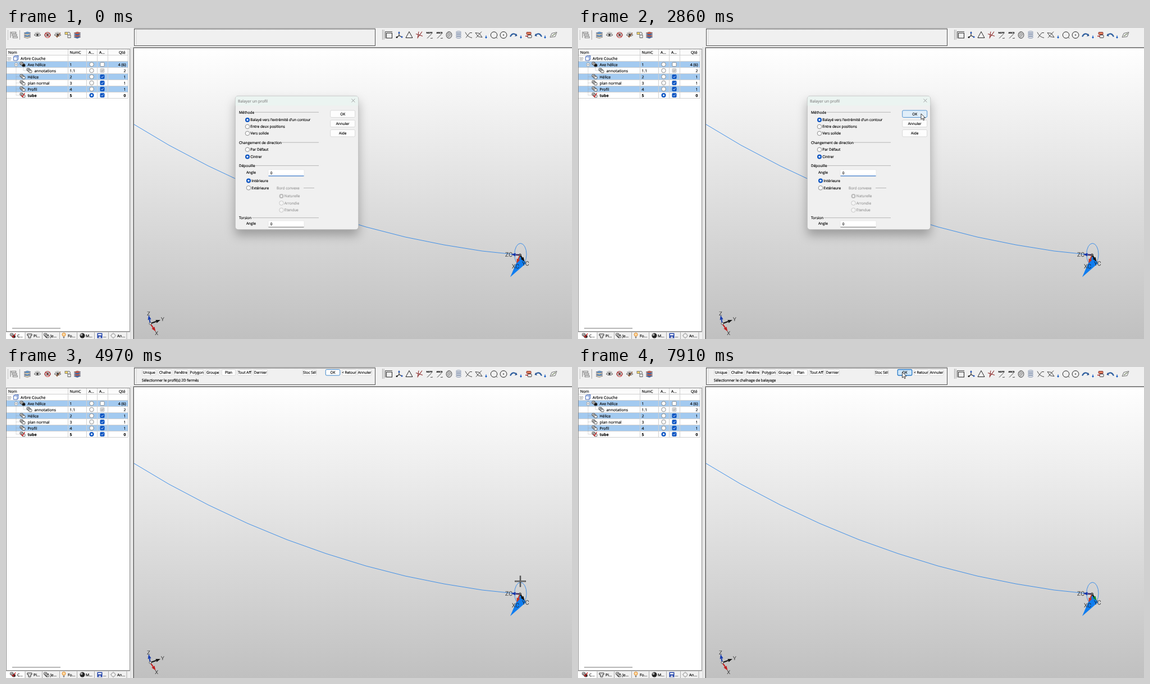
An HTML page that plays this animation: 1008 px wide and 555 px high, repeating every 7990 ms.

```html
<!DOCTYPE html>
<html lang="fr">
<head>
<meta charset="utf-8">
<style>
html, body { margin: 0; width: 100%; height: 100%; overflow: hidden; background: #f0f0f0; }
svg { display: block; width: 1008px; height: 555px; }
text { font-family: "Open Sans", "Noto Sans", sans-serif; text-rendering: geometricPrecision; white-space: pre;
  fill: currentColor; stroke: currentColor; stroke-width: .16px; }
.axis { font-family: Roboto, "Open Sans", sans-serif; font-weight: 300; }
</style>
</head>
<body>
<svg id="stage" viewBox="0 0 1008 555"></svg>
<script>
const LOOP = 7990, TICK = 77.6;
const BLUE = '#0a53c1', LINE = '#3f8fe8', INK = '#000', SMALL = 6.45, MEDIUM = 6.9;

// Drawing helpers, each returns SVG markup
const rect = (x, y, w, h, fill, stroke = 'none', r = 0, more = '') =>
  `<rect x="${x}" y="${y}" width="${w}" height="${h}" rx="${r}" fill="${fill}" stroke="${stroke}" ${more}/>`;
const path = (d, stroke, w = 1, fill = 'none', more = '') =>
  `<path d="${d}" stroke="${stroke}" stroke-width="${w}" fill="${fill}" ${more}/>`;
const circle = (x, y, r, fill, stroke = 'none', w = 1) =>
  `<circle cx="${x}" cy="${y}" r="${r}" fill="${fill}" stroke="${stroke}" stroke-width="${w}"/>`;
const text = (x, y, s, size = SMALL, color = INK, more = '') =>
  `<text x="${x}" y="${y}" font-size="${size}" color="${color}" ${more}>${s}</text>`;
const group = (id, body, more = '') => `<g id="${id}" ${more}>${body}</g>`;
const at = (x, y, body) => `<g transform="translate(${x} ${y})">${body}</g>`;
const MID = 'text-anchor="middle"', END = 'text-anchor="end"', BOLD = 'font-weight="700"';

function button(cx, y, w, h, label, id = '') {
  return rect(cx - w / 2, y, w, h, '#fdfdfd', '#d2d2d2', 2, `stroke-width=".8" id="${id}"`) +
    text(cx, y + h / 2 + 2.3, label, SMALL, INK, MID);
}
function radio(x, y, on, label = '', off = false) {
  const c = off ? '#bdbdbd' : on ? BLUE : '#757575';
  const ring = on ? circle(x, y, 4, c) + circle(x, y, 1.7, '#fff')
                  : circle(x, y, 3.8, off ? '#f4f4f4' : '#fafafa', c, .8);
  return ring + text(x + 5.3, y + 2.3, label, SMALL, off ? '#9a9a9a' : INK);
}
function check(x, y, kind) {
  const fill = ['#fff', BLUE, '#d4d4d4'][kind], edge = ['#777', BLUE, '#c4c4c4'][kind];
  return rect(x - 3.6, y - 3.6, 7.2, 7.2, fill, edge, 1.3, 'stroke-width=".8"') +
    (kind ? path(`M${x - 2} ${y}l1.5 1.6 2.6-3.1`, kind === 1 ? '#fff' : '#999', .9) : '');
}
const layers = fill => [0, 2, 4].map(d =>
  rect(-4.5 + d, -4 + d * .9, 5, 4.2, d === 4 ? fill : '#ddd', '#333', 1, 'stroke-width=".8"')).join('');
const stack = (a, b) => [4, 1.5, -1, -3.5].map((y, i) =>
  path(`M-6 ${y}l6-2 6 1.5-6 2.5z`, '#556', .6, i % 2 ? a : b)).join('');
const eye = (mark = '') => path('M-6 0Q0-5 6 0Q0 4.5 -6 0z', '#444', .9, '#eee') + circle(0, -.2, 1.8, '#333') +
  path('M-5-3Q0-6.5 5-3', '#888', .8) + mark;
const arrow = (x, y, color) => {
  const n = Math.hypot(x, y), u = x / n, v = y / n, bx = x - u * 8, by = y - v * 8;
  return path(`M0 0L${bx} ${by}`, color, 2) +
    path(`M${x} ${y}L${bx - v * 3} ${by + u * 3}L${bx + v * 3} ${by - u * 3}z`, 'none', 0, color);
};

function treePanel() {
  let s = rect(.5, 37.5, 220, 504, '#fff', '#8a8a8a') + rect(1, 38, 219, 10, '#fbfbfb');
  const rows = [
    ['Axe hélice', 38, '1', 0, '4 (6)'], ['annotations', 50, '1.1', 2, '2'], ['Hélice', 38, '2', 1, '1'],
    ['plan normal', 38, '3', 1, '1'], ['Profil', 38, '4', 1, '1'], ['tube', 38, '5', 1, '0']];
  rows.forEach((r, i) => {
    if (i % 2 === 0 && i < 5) s += rect(1, 60 + i * 11, 216, 10, '#a3caf0');
  });
  for (let y = 48.5; y < 130; y += 11) s += path(`M1 ${y}H217`, '#cfcfcf', 1);
  for (const x of [110.5, 143.5, 162.5, 181.5, 217.5]) s += path(`M${x} 38V125.5`, '#cfcfcf', 1);
  s += path('M6 58V54H12M18 59V120H25M18 65H25M18 87H25M18 98H25M18 109H25M31 69V76H37', '#999', .7, 'none', 'stroke-dasharray="1 1"');
  for (const [x, y] of [[5.5, 55], [18, 65.5]])
    s += rect(x - 2.5, y - 2.5, 5, 5, '#fff', '#999', 0, 'stroke-width=".7"') + path(`M${x - 1.4} ${y}h2.8`, '#333', .7);
  s += path('M13.5 51.5l2-2h6.5v6.5l-2 2h-6.5zM13.5 51.5h6.5v6.5M20 51.5l2-2', '#3b62b8', .9, '#f6f9ff');
  s += text(26, 56.6, 'Arbre Couche', 7);
  const head = [[4, 'Nom'], [113.5, 'NumC'], [147, 'A...'], [166, 'A...'], [201, 'Qté']];
  s += head.map(([x, t]) => text(x, 45.5, t, MEDIUM)).join('');
  rows.forEach(([name, x, num, kind, qty], i) => {
    const y = 65 + i * 11, b = i === 5 ? BOLD : '';
    s += at(x - 8.5, y, layers(i ? '#fff' : '#111') + (b && path('M-2 0l2 3 4-7', '#d02020', 1.3)));
    s += text(x + .5, y + 2.5, name, MEDIUM, INK, b) + text(113.5, y + 2.5, num, MEDIUM, INK, b);
    s += radio(152.5, y, i === 5) + check(171.5, y, kind) + text(213.5, y + 2.5, qty, MEDIUM, INK, END + ' ' + b);
  });
  s += path('M11 535.8H97', '#8b8b8b', 1.3);
  return s + tabs();
}
function tabs() {
  let s = rect(0, 542, 34, 14, '#fff') + path('M0 542.5H221', '#aaa', .8);
  const list = [[20, 'C...'], [49, 'Pi...'], [79, 'Je...'], [110, 'Fo...'], [142, 'M...'], [173, '...'], [198, 'An...']];
  s += list.map(([x, t]) => text(x, 551.8, t, MEDIUM)).join('');
  s += [34, 64.5, 95.5, 126.5, 157.5, 182.5, 215].map(x => path(`M${x} 543V555`, '#999', .8)).join('');
  s += at(12, 549, layers('#222') + path('M-1 0l2 3 4-7', '#c22', 1.4));
  s += at(42, 549, path('M-4-3h8v3h-2v4h-4v-4h-2z', '#333', 1, '#ddd'));
  s += at(72, 549, layers('#eee') + path('M-2 1l2 3 4-6', '#333', 1));
  s += at(103, 548, circle(0, -1, 3, '#ffd9a0', '#e08a2a') + path('M-1.5 3.5h3M-1 5h2', '#555', 1));
  s += at(136, 549, circle(0, 0, 4.5, '#222') + circle(-1.5, -1.5, 2, '#aaa'));
  s += at(167, 549, rect(-4.5, -4.5, 9, 9, '#2244aa') + rect(-3, -3, 6, 2.5, '#fff') + rect(-2, 1.5, 4, 3, '#ccd'));
  s += at(191, 549, circle(0, 0, 3.4, '#f4f4f4', '#aaa', 1.2) + path('M0-5.5V-3M0 3V5.5M-5.5 0H-3M3 0H5.5', '#aaa', 1));
  return s;
}
function toolbar() {
  const down = path('M0-2V1', BLUE, 1.2) + path('M-2 .5h4L0 3.5z', 'none', 0, BLUE);
  const sweep = path('M-6 3Q-2-5 4-.5', '#2f5f9f', 2.2) + path('M2 2.5l4.5-1-1.5-4z', 'none', 0, '#24508f');
  const note = s => text(0, -3, s, 4, INK, MID + ' ' + BOLD) + path('M-4 6L4-2M2 6l4-.5', '#333', .9);
  const icons = [
    [14, [-4, 0, 4].map(y => rect(-3 + y * .3, y - 1.3, 8, 2.6, '#f4f4f4', '#555', 0, 'stroke-width=".7"')).join('') + path('M-6-6V5', '#555', .8)],
    [38, stack('#5c9bd8', '#f3e3bd')], [56, eye()], [74, eye(circle(0, 0, 4.8, 'none', '#c83c3c', 1.1) + path('M-3.4-3.4l6.8 6.8', '#c83c3c', 1.1))],
    [92, eye(path('M-3 1l2 3 6-8', '#8a4a22', 1.2))],
    [110, rect(-5, -5, 5, 4, '#f0d468', '#666', 0, 'stroke-width=".8"') + rect(0, 0, 5, 5, '#eee', '#444', 0, 'stroke-width=".8"') + path('M1-5q4 0 3 4', '#333', .9)],
    [127, stack('#d8583c', '#3f6fb8')],
    [682, rect(-4.5, -3.5, 10, 9, 'none', '#222') + path('M-6.5-6V6M-6.5-6H6', '#222', .8)],
    [700, path('M0-6V1L-5 5M0 1L6 4', '#222', 1.1) + circle(0, -4, 1.5, '#25b') + circle(-4, 4, 1.5, '#222') + circle(5, 3.5, 1.5, '#25b')],
    [718, path('M0-6L6 5H-6z', '#222', 1)], [736, path('M-6-2L6 2M-1-6L-3 6M-3 5L5-6', '#8c2a2a', 1.1)],
    [754, note('NOTE')], [772, note('ABCD')],
    [789, `<ellipse rx="5" ry="6" fill="#ccc" stroke="#555"/>` + path('M-4 2l6-6M-3 5l7-8M-4-2l4-3', '#666', .7)],
    [806, [-5, -2, 1, 4].map(y => `<ellipse cy="${y}" rx="4.5" ry="1.7" fill="none" stroke="#5b7199" stroke-width=".8"/>`).join('')],
    [824, path('M-6-5Q-2 4 6 5M-5 5L2-4H6', '#333', .9)], [842, path('M-6-4l7 1 5 7-7-1zM-5 5L5-6', '#333', .9)],
    [855, at(0, 3, down)], [869, circle(0, 0, 5.7, 'none', '#222') + path('M4 4l2 2', '#222')], [886, circle(0, 0, 5.9, 'none', '#222') + circle(0, 0, 1, '#222')],
    [904, sweep], [917, at(0, 3, down)],
    [931, rect(-4, -5, 8, 4, '#e0805c', '#833', 1) + rect(-2, 0, 7, 5, '#eee', '#444', 1) + path('M-6 2h5', '#a22', 1.5)],
    [948, `<g transform="scale(-1 1)">${sweep}</g>`], [960, at(0, 3, down)],
    [975, path('M-6 4L-3-3 6-5 3 3z', '#666', .9, '#eee') + path('M-3 2L4-3', '#7a8a6a', 1.2)]];
  return icons.map(([x, b]) => at(x, 12.5, b)).join('') +
    path('M3.5 4V21', '#999', 1, 'none', 'stroke-dasharray="1 1"') +
    path('M24.5 4V21M670.5 3V21M673 3V21', '#aaa', 1);
}
function promptBar() {
  const labels = ['Unique', 'Chaîne', 'Fenêtre', 'Polygon', 'Groupe', 'Plan', 'Tout Aff'];
  const bt = (cx, t, id) => button(cx, 4.5, 24.5, 10.5, t, id);
  const body = labels.map((t, i) => bt(254.8 + i * 28.35, t)).join('') +
    bt(540.5, 'Stoc Sél') + button(582, 4.5, 25.5, 10.5, 'OK', 'barOk') + bt(611, '&lt; Retour') + bt(638.7, 'Annuler') +
    group('last', bt(453.2, 'Dernier')) + group('undo', bt(453.2, 'Retire') + bt(482, 'Réinit')) +
    text(242, 26.3, '', SMALL, INK, 'id="hint"');
  return rect(228.5, 1.5, 429, 30, '#f0f0f0', '#555') +
    path('M229 2.8H657M232 4V29', '#aaa', .8, 'none', 'stroke-dasharray="1 1"') + group('bar', body);
}
function scene() {
  const ends = [[228, 172], [290, 209], [360, 246], [430, 279], [500, 308], [570, 333], [641, 355], [711, 373], [780, 387], [848, 398], [905, 404]];
  const label = (x, y, s, size = 10.5) => text(x, y, s, size, '#222', 'class="axis"');
  return rect(228, 36, 780, 519, 'url(#sky)') + path('M226.5 555V34.5H1008', '#a0a0a0', 1) +
    path('M227.5 555V35.5H1008', '#696969', 1) + path('M222.5 34V555', '#ccc', 1) +
    path('M' + ends.join('L'), LINE, 1) +
    path('M915 405L926 420L898 444.5z', 'none', 0, '#0f7df0') +
    `<ellipse id="ring" cx="916.3" cy="404" rx="10.7" ry="19.7" fill="none" stroke-width="1" clip-path="url(#upper)"/>` +
    at(915.5, 405, arrow(-16, -1, '#1736a8') + path('M-7 0L0 0', '#4a2458', 2.2) + arrow(-6, 15, '#c8301c') +
      group('yTip', arrow(8, 12, 'currentColor')) + path('M0 0L3.5 5.5', '#111', 2) + circle(0, 0, 2, '#777', '#222', .8)) +
    label(889, 407.8, 'ZC') + label(901, 428.8, 'XC') + label(919, 423.8, 'Y') + label(924.8, 423.8, 'C') +
    at(257, 527.5, arrow(-3, -15, '#1b3fae') + arrow(18, -6.5, '#161616') + arrow(9.5, 14, '#c01c1c') + circle(0, 0, 2, '#ddd', '#444', .8)) +
    label(251, 513, 'Z', 9.5) + label(276, 522.5, 'Y', 9.5) + label(265.3, 547.5, 'X', 9.5);
}
function dialog() {
  const title = (x, y, s, from, to, c = INK) => text(x, y + 2.3, s, SMALL, c) + path(`M${from} ${y}H${to}`, '#a8a8a8', .8);
  const field = (y, edge) => rect(467, y, 64, 11.5, '#fff', '#e2e2e2', 1.5, 'stroke-width=".7"') +
    path(`M467.5 ${y + 11.3}H530.5`, edge, 1.2);
  return rect(408.3, 121.3, 219.4, 238.4, '#f0f0f0', '#b4b4b4', 5, 'id="frame" stroke-width=".8"') +
    path('M408.7 138.5V126Q408.7 121.7 413 121.7H623Q627.3 121.7 627.3 126V138.5z', 'none', 0, '#ebf4f1') +
    text(413, 132.6, 'Balayer un profil', MEDIUM, INK, 'id="caption"') +
    path('M615.4 126.5l6 6M621.4 126.5l-6 6', '#444', .8, 'none', 'id="close"') +
    title(415, 150.3, 'Méthode', 443, 557) + radio(430, 164, true, "Balayé vers l'extrémité d'un contour") +
    radio(430, 176, false, 'Entre deux positions') + radio(430, 188, false, 'Vers solide') +
    title(415, 204.2, 'Changement de direction', 491, 557) + radio(430, 217, false, 'Par Défaut') + radio(430, 229.7, true, 'Cintrer') +
    title(415, 245.6, 'Dépouille', 443, 557) + text(428, 260.3, 'Angle') + field(252.7, '#0d5cc2') +
    rect(470.3, 254, 5, 8.6, '#1668c8', 'none', 0, 'id="pick"') + text(470.8, 260.7, '0', SMALL, INK, 'id="zero"') +
    path('M475.3 254V262.5', '#111', .8, 'none', 'id="caret"') +
    radio(432, 272.5, true, 'Intérieure') + radio(432, 285.3, false, 'Extérieure') +
    title(482, 285.5, 'Bord convexe', 530, 549, '#9a9a9a') +
    radio(490.5, 300, true, 'Naturelle', true) + radio(490.5, 312.4, false, 'Arrondie', true) + radio(490.5, 325, false, 'Etendue', true) +
    title(415, 338.7, 'Torsion', 438, 557) + text(428, 351.3, 'Angle') + field(344, '#8c8c8c') + text(470.8, 352.3, '0') +
    button(599.7, 147, 44, 12.5, 'OK', 'ok') + button(599.7, 164.3, 44, 12.5, 'Annuler') + button(599.7, 181.5, 44, 12.5, 'Aide');
}

const $ = id => document.getElementById(id);
$('stage').innerHTML =
  `<defs><linearGradient id="sky" x1="0" y1="0" x2="0" y2="1"><stop offset="0" stop-color="#fff"/><stop offset="1" stop-color="#c0c0c0"/></linearGradient>
   <clipPath id="upper"><path d="M895 380H935V418H922L915 405L909 418H895z"/></clipPath></defs>` +
  rect(0, 0, 1008, 555, '#f0f0f0') + scene() + treePanel() + toolbar() + promptBar() + group('box', dialog()) +
  group('hand', path('M0 0V10.2L2.4 8L4 11.7L5.7 11L4.1 7.4H7.4z', '#111', .8, '#fff')) +
  group('cross', path('M-10 0H10M0-10V10', '#333', 2.4) + path('M-9.3 0H9.3M0-9.3V9.3', '#999', .7));

// Pointer stops: tick, x, y
const stops = [
  [1, 933, 503], [6, 428, 166], [11, 588, 146], [14, 590, 152], [16, 589, 154], [18, 589, 154], [23, 545.5, 147],
  [27, 611, 153], [43, 611, 153], [47, 540, 180], [54, 747.5, 316], [61, 916, 414], [65, 916, 377], [74, 916, 377],
  [83, 443, 62], [86, 406, 40], [88, 405, 39], [92, 550, 23], [93, 550, 23], [98, 577.5, 9], [104, 577.5, 9]];
function pointer(k) {
  const i = Math.max(1, stops.findIndex(s => s[0] >= k));
  const [a, x, y] = stops[i - 1], [b, X, Y] = stops[i];
  const p = Math.min(1, Math.max(0, (k - a) / (b - a))), e = (1 - Math.cos(Math.PI * p)) / 2;
  return [x + (X - x) * e, y + (Y - y) * e];
}
const show = (id, on) => { $(id).style.display = on ? '' : 'none'; };
const paint = (id, fill, stroke) => { $(id).setAttribute('fill', fill); $(id).setAttribute('stroke', stroke); };

function draw(k) {
  const active = k >= 18, focus = active && k < 37, over = (k >= 12 && k < 20) || k >= 26;
  const [x, y] = pointer(k), crossed = k >= 38 && k < 90;
  for (const id of ['hand', 'cross']) $(id).setAttribute('transform', `translate(${x} ${y})`);
  show('cross', crossed);
  show('hand', k >= 1 && !crossed);

  const fade = Math.max(0, k - 37);
  const scale = 1 - [0, .01, .03, .053][Math.min(3, fade)];
  show('box', fade < 4);
  $('box').setAttribute('opacity', [1, .85, .55, .28][Math.min(3, fade)]);
  $('box').setAttribute('transform', `translate(${518 - fade * .67} ${240.5 - fade * .33}) scale(${scale}) translate(-518 -240.5)`);
  $('frame').style.filter = focus ? 'drop-shadow(0 11px 11px rgba(0,0,0,.42))' : 'drop-shadow(0 10px 9px rgba(0,0,0,.28))';
  $('caption').setAttribute('color', focus ? INK : '#8b8b8b');
  $('close').setAttribute('stroke', focus ? '#333' : '#8b8b8b');
  $('zero').setAttribute('color', focus ? '#fff' : INK);
  show('pick', focus);
  show('caret', focus && k >= 24 && k < 31);
  paint('ok', over ? '#e0eef9' : '#fdfdfd', active || over ? '#2a7bc8' : '#d2d2d2');

  const picked = k >= 71 && k < 101;
  show('bar', k >= 38);
  show('last', !picked);
  show('undo', picked);
  $('hint').textContent = k < 71 ? 'Sélectionner le profil(s) 2D fermés'
    : picked ? 'Choisir une méthode ou sélectionner une entité (1 entités)' : 'Sélectionner le chaînage de balayage';
  paint('barOk', k >= 96 ? '#cfe6f8' : '#fdfdfd', '#2a7bc8');
  $('barOk').setAttribute('stroke-width', k >= 96 ? 1.3 : .9);
  $('ring').setAttribute('stroke', !picked ? LINE : k < 75 ? '#2ca36c' : '#777');
  $('yTip').style.color = k < 71 ? '#111' : '#128a2c';
}

const start = performance.now();
function loop() {
  const t = (performance.now() - start) % LOOP;
  draw(Math.floor((t + 14) / TICK));
  requestAnimationFrame(loop);
}
loop();
</script>
</body>
</html>
```
